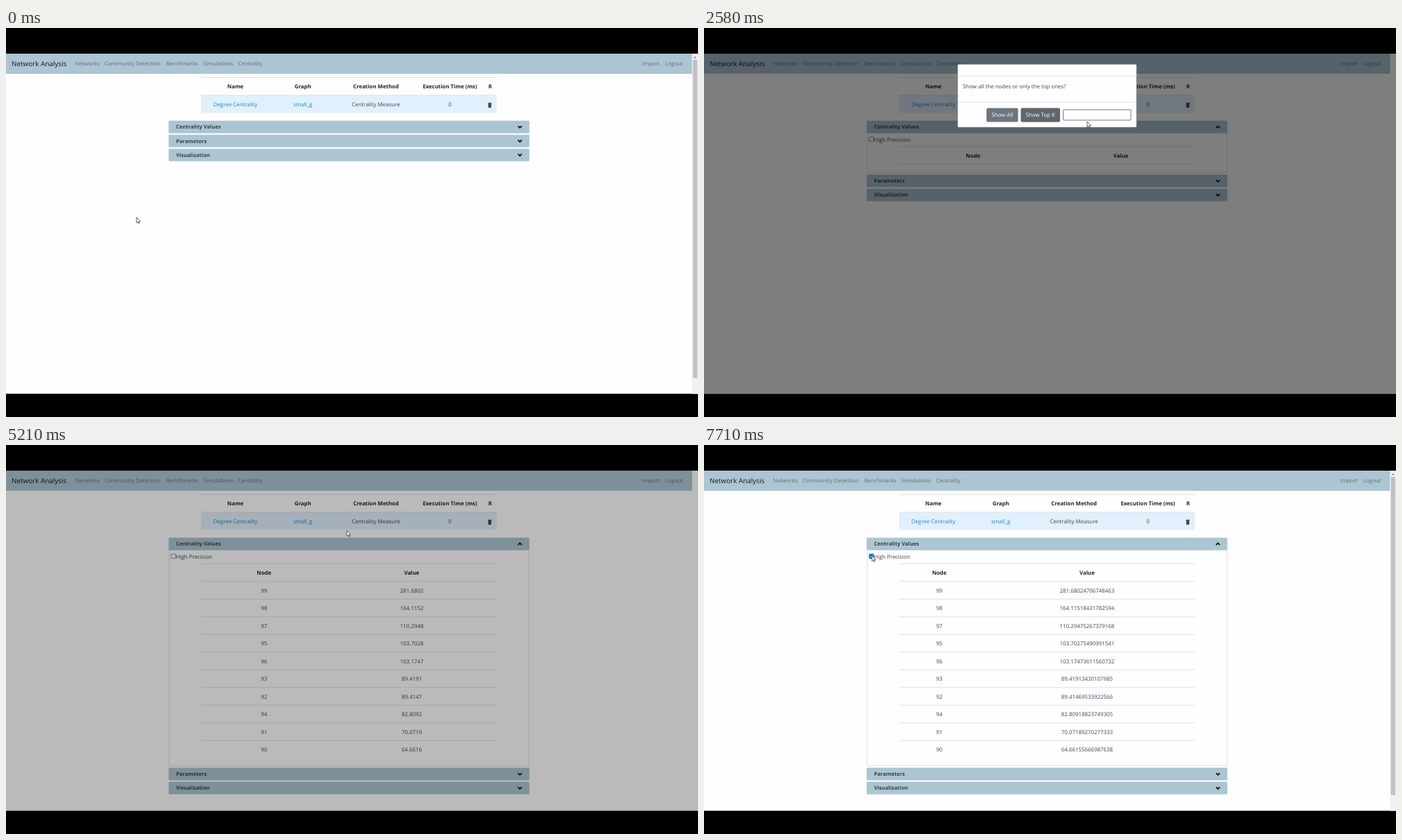
These frames come from a looping animation (997x561 px, 8 s). An HTML page:

```html
<!DOCTYPE html>
<html lang="en">
<head>
<meta charset="utf-8">
<title>Network Analysis</title>
<style>
  html, body { margin: 0; width: 100%; height: 100%; overflow: hidden; background: #000; }
  svg { display: block; width: 997px; height: 561px; }
  text { font: 7.9px "Open Sans", "Noto Sans", sans-serif; fill: #41464b; text-rendering: geometricPrecision; }
  .brand { font-size: 9.9px; fill: #15191c; }
  .nav { fill: #626f77; }
  .mid { text-anchor: middle; }
  .head { font-weight: 700; font-size: 7.8px; fill: #212529; }
  .title { font-weight: 700; font-size: 7.6px; fill: #37434a; }
  .link { fill: #2482c5; }
  .white { fill: #fff; }
  .line { stroke: #dee1e5; stroke-width: 1; }
  .bar { fill: #acc5d3; stroke: #a3bbc8; stroke-width: .5; }
  .chevron { fill: none; stroke: #111; stroke-width: 1.8; }
  .cursor { fill: #fff; stroke: #222; stroke-width: .7; stroke-linejoin: round; }
</style>
</head>
<body>
<svg id="stage" viewBox="0 0 997 561"></svg>
<script>
const LOOP = 8000;
const OPEN = 900, SUBMIT = 4841, CLOSED = 5291, CHECK = 7450;
const SHORT = 57.6, TALL = 311.6;

const scores = [
  [99, "281.68024706748463"], [98, "164.11518431782594"], [97, "110.29475267379168"],
  [95, "103.70275490991541"], [96, "103.17473611560732"], [93, "89.41913430107985"],
  [92, "89.41469533922566"], [94, "82.80918823749305"], [91, "70.07189270277333"],
  [90, "64.66155666987638"]
];

// time, x, y of the pointer tip
const path = [
  [0, 188, 273], [580, 350.5, 145], [1720, 350.5, 145], [2420, 490, 128], [2560, 552, 135],
  [2590, 552, 135], [2700, 550, 127], [3900, 550, 127], [4400, 491, 123.5], [5910, 491, 123.5],
  [6130, 415, 136], [6600, 330, 146], [7150, 242, 159.5]
];
// start, end, pointer shape
const shapes = [
  [540, OPEN + 40, "hand"], [2380, 2500, "hand"], [2630, 4260, "beam"],
  [4330, SUBMIT, "hand"], [6080, 6800, "hand"]
];

const text = (x, y, cls, str) => `<text x="${x}" y="${y}" class="${cls}">${str}</text>`;
const rect = (x, y, w, h, attrs) => `<rect x="${x}" y="${y}" width="${w}" height="${h}" ${attrs}/>`;
const line = y => `<path class="line" d="M281 ${y}H707"/>`;
const panel = (id, y, title) => `<g id="${id}">
  ${rect(234.7, y, 519, 17.4, 'rx="1" class="bar"')}${text(245, y + 11.4, "title", title)}
  <path id="${id}Mark" class="chevron" d="M737.7 ${y + 7.3}l2.7 2.7 2.7-2.7"/></g>`;

const nav = [[99.5, "Networks"], [142, "Community Detection"], [231, "Benchmarks"],
  [284, "Simulations"], [334.5, "Centrality"], [916.5, "Import"], [949.5, "Logout"]];
const columns = [[330.5, "Name", "Degree Centrality", "link"], [427.7, "Graph", "small_g", "link"],
  [533, "Creation Method", "Centrality Measure", ""], [639.5, "Execution Time (ms)", "0", ""],
  [697.7, "R", "", ""]];

document.getElementById("stage").innerHTML = `
<defs><clipPath id="bodyClip"><rect id="clip" x="230" y="151.5" width="530" height="0"/></clipPath></defs>
${rect(0, 37, 997, 490.5, 'fill="#fefdff"')}
${rect(0, 37, 988.5, 29, 'fill="#acc5d3"')}
${text(8, 55.2, "brand", "Network Analysis")}
${nav.map(([x, s]) => text(x, 54.4, "nav", s)).join("")}
${line(71.3)}${rect(281, 97, 426, 25.6, 'fill="#e1f0fd"')}${line(97)}
${columns.map(([x, head, cell, cls]) =>
  text(x, 87.3, "mid head", head) + text(x, 113.4, "mid " + cls, cell)).join("")}
<path d="M694.3 108.6h5.4M696 108.2h2" stroke="#222" stroke-width="1"/>
<path d="M694.7 109.6h4.6l-.3 5.2h-4z" fill="#222"/>
<path d="M696.1 110.8v3M697.9 110.8v3" stroke="#bcc8d2" stroke-width=".5"/>
<g id="body" clip-path="url(#bodyClip)">
  <rect id="frame" x="235" y="140" width="518.5" fill="none" stroke="#dfdfe2"/>
  <rect id="box" x="238" y="157.2" width="6.4" height="6.4" rx="1"/>
  <path id="tick" d="M239.3 160.4l1.5 1.6 2.6-3.2" fill="none" stroke="#fff"/>
  ${text(244.6, 163.7, "", "High Precision")}${line(171)}${line(196.7)}
  <g id="nodes">${text(0, 187.1, "mid head", "Node")}</g>
  <g id="values">${text(0, 187.1, "mid head", "Value")}</g>
  <g id="lines">${scores.slice(1).map((_, i) => line(222.4 + i * 25.47)).join("")}</g>
</g>
${panel("first", 134, "Centrality Values")}
${panel("second", 154.2, "Parameters")}
${panel("third", 174.4, "Visualization")}
<g id="scroll">${rect(988.5, 37, 8.5, 490.5, 'fill="#f1f0f2"')}
  ${rect(989.6, 46, 6.3, 459, 'fill="#c1c0c2"')}
  <path d="M990.7 43.2l2-2.2 2 2.2z" fill="#777"/></g>
${rect(0, 37, 997, 490.5, 'id="shade"')}
<g id="modal">
  ${rect(365.3, 52.3, 258, 91, 'rx="1.5" fill="#fefdff" stroke="#555" stroke-width=".5"')}
  <path d="M365.5 69H623M365.5 107H623" stroke="#e5e5e8"/>
  ${text(373, 86.9, "", "Show all the nodes or only the top ones?")}
  ${rect(407, 115.5, 45.5, 20, 'rx="2" fill="#6c757d"')}
  ${rect(456.5, 115.5, 56.5, 20, 'rx="2" fill="#6c757d"')}
  ${rect(456.5, 115.5, 56.5, 20, 'id="hover" rx="2" fill="#545b62"')}
  ${text(429.7, 128.4, "mid white", "Show All")}${text(484.7, 128.4, "mid white", "Show Top K")}
  ${rect(517.5, 117.9, 97.5, 15, 'id="field" rx="1" fill="#fff"')}
  ${text(519.3, 128.4, "", "<tspan id='typed'></tspan>")}
</g>
<g id="pointer" class="cursor">
  <path id="arrow" d="M0 0V8L1.9 6.3 3.1 9 4.3 8.5 3.1 5.9H5.6Z"/>
  <path id="hand" d="M-.9 .8a.8.8 0 0 1 1.6 0V3.8l3 .7q1.2.3 1 1.6L4 10.6H0L-2.7 7q-.6-1 .3-1.3L-.9 6.6Z"/>
  <path id="beam" d="M-1.5-4.5H1.5M0-4.5V4.5M-1.5 4.5H1.5" fill="none"/>
</g>`;

const $ = Object.fromEntries([...document.querySelectorAll("[id]")].map(e => [e.id, e]));
const set = (el, attrs) => { for (const k in attrs) el.setAttribute(k, attrs[k]); };
const show = (el, on) => set(el, { visibility: on ? "visible" : "hidden" });

const column = (id, cells) => {
  const g = document.createElementNS("http://www.w3.org/2000/svg", "g");
  g.innerHTML = cells.map((s, i) => text(0, 213 + i * 25.47, "mid", s)).join("");
  return $[id].appendChild(g);
};
const nodeCells = column("nodes", scores.map(s => s[0]));
const roundCells = column("values", scores.map(s => (+s[1]).toFixed(4)));
const fullCells = column("values", scores.map(s => s[1]));

const part = (t, start, length) => Math.min(1, Math.max(0, (t - start) / length));
const smooth = p => p * p * (3 - 2 * p);

// CSS-style cubic Bézier easing, solved by bisection
const bezier = (x1, y1, x2, y2) => x => {
  const at = (a, b, s) => 3 * a * s * (1 - s) ** 2 + 3 * b * s * s * (1 - s) + s ** 3;
  let lo = 0, hi = 1;
  for (let i = 0; i < 18; i++) {
    const s = (lo + hi) / 2;
    if (at(x1, x2, s) < x) lo = s; else hi = s;
  }
  return at(y1, y2, hi);
};
const ease = bezier(.25, .1, .25, 1), easeOut = bezier(0, 0, .58, 1);

function pointerAt(t) {
  const i = path.findIndex(p => p[0] > t);
  if (i < 0) return path[path.length - 1].slice(1);
  const [t0, x0, y0] = path[i - 1], [t1, x1, y1] = path[i];
  const p = smooth((t - t0) / (t1 - t0));
  return [x0 + (x1 - x0) * p, y0 + (y1 - y0) * p];
}

function draw(t) {
  const filled = t >= SUBMIT, full = t >= CHECK, opened = t >= OPEN;
  const drop = filled ? TALL : SHORT * ease(part(t, OPEN, 350));

  set($.clip, { height: drop });
  set($.frame, { height: Math.max(0, 11 + drop) });
  show($.body, opened);
  for (const g of [$.second, $.third]) set(g, { transform: `translate(0 ${drop})` });
  set($.firstMark, { transform: opened ? "rotate(180 740.4 142.7)" : "" });

  const shift = full ? 339 : filled ? 371.7 : 387.7;
  set($.nodes, { transform: `translate(${shift} 0)` });
  set($.values, { transform: `translate(${shift + 212.9} 0)` });
  for (const g of [nodeCells, $.lines]) set(g, { display: filled ? "inline" : "none" });
  set(roundCells, { display: filled && !full ? "inline" : "none" });
  set(fullCells, { display: full ? "inline" : "none" });
  set($.box, { fill: full ? "#0b6cb8" : "#fff", stroke: full ? "#0b6cb8" : "#767676", "stroke-width": .8 });
  set($.tick, { display: full ? "inline" : "none" });

  show($.scroll, !opened || t >= CLOSED);
  set($.shade, { opacity: .5 * (part(t, OPEN, 150) - part(t, SUBMIT + 300, 150)) });

  const lift = 1 - easeOut(part(t, OPEN + 150, 300)) + easeOut(part(t, SUBMIT, 300));
  set($.modal, {
    transform: `translate(0 ${-26 * lift})`,
    opacity: part(t, OPEN + 150, 150) - part(t, SUBMIT, 150)
  });
  set($.hover, {
    opacity: part(t, 2380, 120) - part(t, 2510, 150) + part(t, 4330, 150)
  });
  const focused = t >= 2760 && t < SUBMIT - 100 ;
  set($.field, { stroke: focused ? "#222" : "#767676", "stroke-width": focused ? 1.6 : 1 });
  $.typed.textContent = "10".slice(0, t < 3400 ? 0 : t < 3600 ? 1 : 2);

  const [x, y] = pointerAt(t);
  const shape = (shapes.find(([a, b]) => t >= a && t < b) || [0, 0, "arrow"])[2];
  set($.pointer, { transform: `translate(${x} ${y})` });
  for (const id of ["arrow", "hand", "beam"]) show($[id], id === shape);
}

function tick() {
  draw(performance.now() % LOOP);
  requestAnimationFrame(tick);
}
tick();
</script>
</body>
</html>
```
